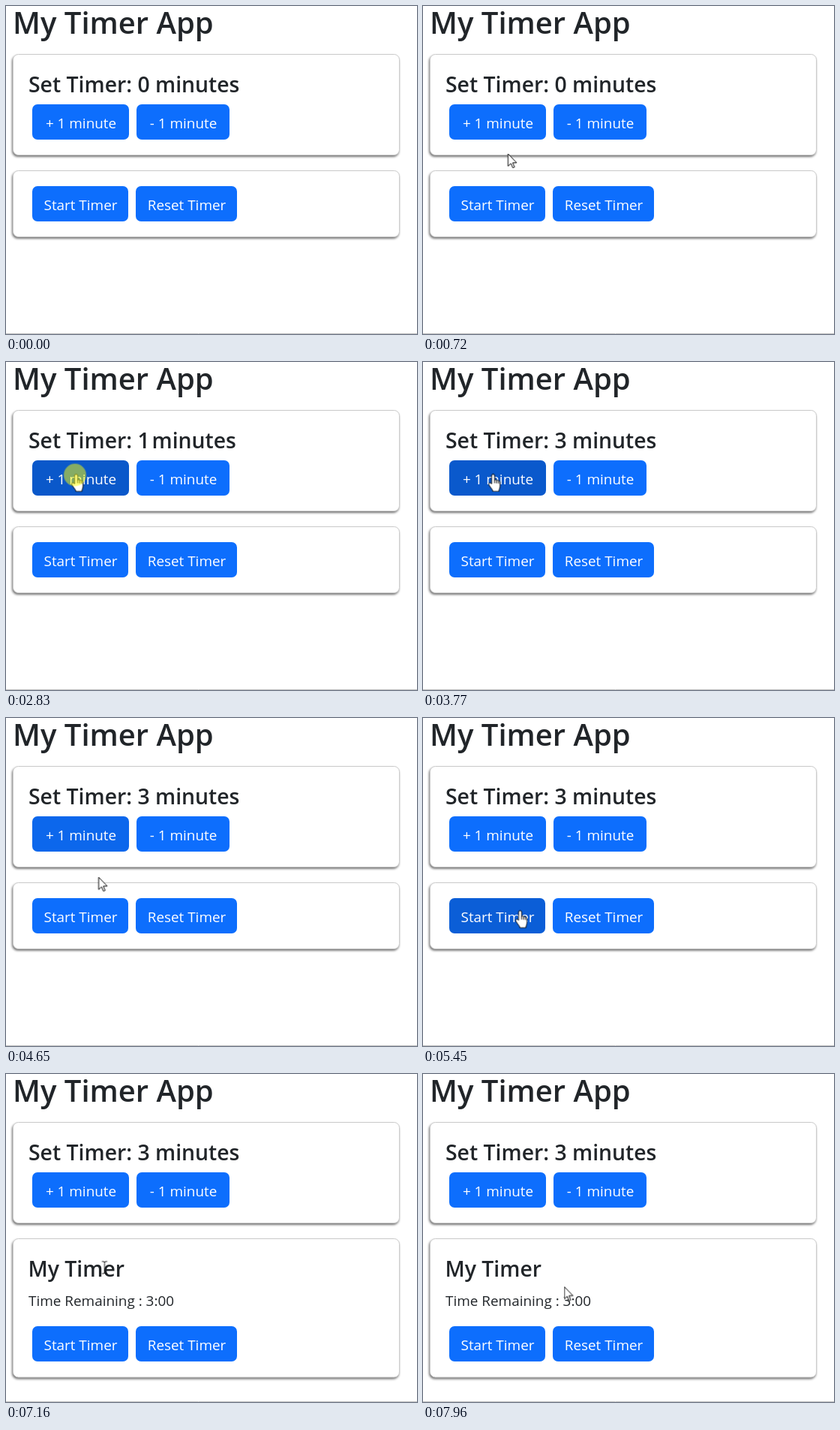
Recreate the animation shown at these times as an HTML page. Size 548 by 437 pixels, loop 8000 ms.

```html
<!DOCTYPE html>
<html lang="en">
<head>
<meta charset="utf-8">
<title>My Timer App</title>
<style>
  html, body { margin: 0; width: 100%; height: 100%; overflow: hidden; background: #fff; }
  svg { display: block; width: 548px; height: 437px; }
  text { font: 400 18.9px "Open Sans", "Noto Sans", sans-serif; fill: #212529; white-space: pre; }
  .h1 { font-size: 40px; font-weight: 600; }
  .h3 { font-size: 28.4px; font-weight: 600; }
  .card { fill: #fff; stroke: #cbcbcb; filter: drop-shadow(-1px 2px 1.5px rgba(0, 0, 0, .55)); }
  .btn rect { fill: #0d6efd; }
  .btn text { fill: #fff; text-anchor: middle; }
  .glyph { fill: #fff; stroke: #000; stroke-linejoin: round; }
</style>
</head>
<body>
<svg viewBox="0 0 548 437">
  <text class="h1" x="9" y="37">My Timer App</text>

  <rect class="card" x="9.5" y="64.5" width="515" height="134" rx="7"/>
  <g id="counts">
    <text class="h3" x="30" y="115">Set Timer: 0 minutes</text>
    <text class="h3" x="30" y="115">Set Timer: 1<tspan dx="-4.5"> minutes</tspan></text>
    <text class="h3" x="30" y="115">Set Timer: 2 minutes</text>
    <text class="h3" x="30" y="115">Set Timer: 3 minutes</text>
  </g>
  <g class="btn">
    <rect id="plus" x="35" y="131" width="129" height="47" rx="7"/>
    <text x="100" y="163">+ 1 minute</text>
    <rect x="174" y="131" width="124" height="47" rx="7"/>
    <text x="236.5" y="163">- 1 minute</text>
  </g>

  <rect class="card" id="panel" x="9.5" y="219.5" width="515" height="88" rx="7"/>
  <g id="remaining">
    <text class="h3" x="29.5" y="270">My Timer</text>
    <text x="30" y="309">Time Remaining : 3:00</text>
  </g>
  <g class="btn" id="controls">
    <rect id="start" x="35" y="240" width="128" height="47" rx="7"/>
    <text x="99.5" y="272">Start Timer</text>
    <rect x="173" y="240" width="135" height="47" rx="7"/>
    <text x="241" y="272">Reset Timer</text>
  </g>

  <path d="M0 436.5H548" stroke="#c4c4c4"/>

  <g id="cursor">
    <path id="arrow" class="glyph" d="M0 0V16.4L3.8 12.8 6.3 18.6 8.7 17.6 6.2 11.9H11.5Z"/>
    <g id="hand" class="glyph">
      <path d="M-2 13V2a2 2 0 0 1 4 0v6.2a1.4 1.4 0 0 1 2.7.5 1.3 1.3 0 0 1 2.5.6 1.2 1.2 0 0 1 2 1V16c0 3-1.5 4-1.5 7H-.3c0-2.5-3-4.5-5.3-8.8-1-2 .8-3.6 2.4-2.2Z"/>
      <path d="M2 8v4M4.7 8.8v3.4M7.2 9.4v3" fill="none"/>
    </g>
    <path id="beam" d="M-3.5-8H-1L0-7 1-8H3.5M0-7V7M-3.5 8H-1L0 7 1 8H3.5" fill="none" stroke="#111"/>
    <circle id="press" r="15" cx="-1.5" cy="1" fill="#ff0" fill-opacity=".5"/>
  </g>
</svg>
<script>
const LOOP = 8000;
const OPENED = 5850;
const BASE = '#0d6efd', HOVER = '#0b5ed7', ACTIVE = '#0a58ca';
const $ = id => document.getElementById(id);

// steps: [time, value, easing towards the next step]
function play(el, prop, steps) {
  const all = [[0, steps[0][1], 'step-end'], ...steps, [LOOP, steps.at(-1)[1]]];
  el.animate(
    all.map(([t, value, easing = 'linear']) => ({ offset: t / LOOP, [prop]: value, easing })),
    { duration: LOOP, iterations: Infinity });
}

function show(el, ...spans) {
  const steps = spans.flatMap(([from, to]) => [[from, 1, 'step-end'], [to, 0, 'step-end']]);
  play(el, 'opacity', [[0, 0, 'step-end'], ...steps]);
}

const counted = [0, 2300, 3020, 3720, LOOP];
[...$('counts').children].forEach((el, i) => show(el, [counted[i], counted[i + 1]]));

play($('plus'), 'fill', [
  [1080, BASE], [1430, HOVER],
  [2080, HOVER], [2200, ACTIVE], [2300, ACTIVE], [2630, HOVER],
  [2820, HOVER], [2830, ACTIVE], [3030, ACTIVE], [3380, HOVER],
  [3530, HOVER], [3600, ACTIVE], [3730, ACTIVE], [4080, HOVER],
  [4400, HOVER], [4850, BASE]
]);
play($('start'), 'fill', [
  [4900, BASE], [5250, HOVER], [5580, HOVER], [5700, ACTIVE], [6160, ACTIVE], [6520, BASE]
]);

play($('panel'), 'height', [[0, '88px', 'step-end'], [OPENED, '184.5px']]);
play($('controls'), 'transform', [[0, 'translateY(0px)', 'step-end'], [OPENED, 'translateY(96px)']]);
show($('remaining'), [OPENED, LOOP]);

const path = [
  [140, 438, 425, 'cubic-bezier(.3, .5, .6, 1)'], [940, 85, 177],
  [1040, 85, 177], [1400, 79.5, 159.5, 'ease-in-out'], [1840, 93.5, 149.5],
  [4000, 93.5, 149.5, 'cubic-bezier(.5, 0, .9, .6)'], [4430, 118, 195],
  [4530, 118, 195], [4650, 123.5, 212, 'cubic-bezier(.3, .6, .6, 1)'], [5330, 129.5, 256.5],
  [7040, 129.5, 257, 'cubic-bezier(.4, 0, .7, .8)'], [7840, 181, 277],
  [7930, 181, 277, 'step-end'], [7940, 184.5, 280, 'step-end'], [7960, 188.5, 283.5]
];
play($('cursor'), 'transform', path.map(([t, x, y, ease]) => [t, `translate(${x}px, ${y}px)`, ease]));
show($('cursor'), [140, LOOP]);
show($('arrow'), [0, 1080], [4370, 4880], [7520, LOOP]);
show($('hand'), [1080, 4370], [4880, 6040]);
show($('beam'), [6040, 7520]);
show($('press'), [2080, 2280], [2830, 3000], [3530, 3700], [5580, 5760]);
</script>
</body>
</html>
```
